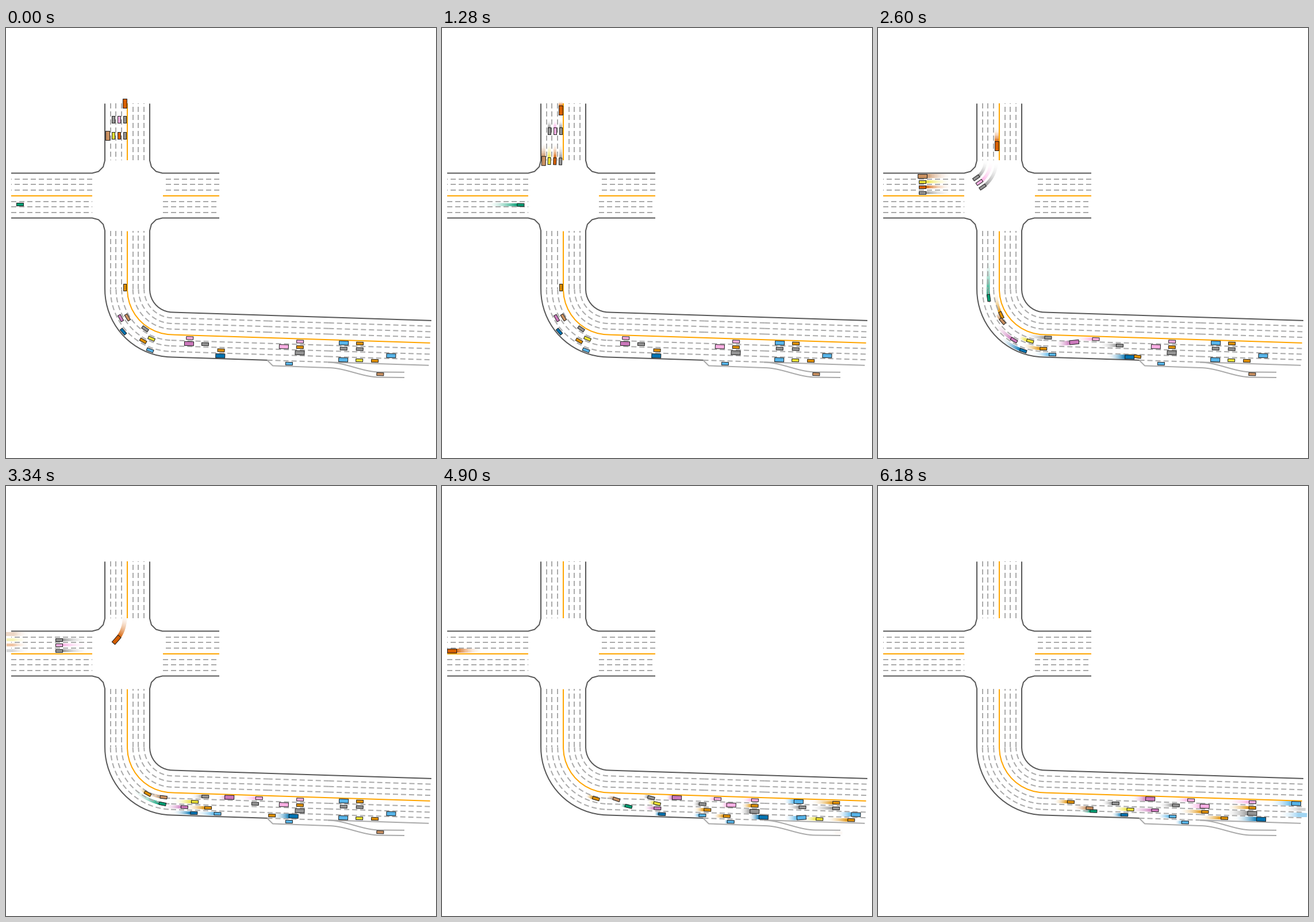
Animation of 748x748 px, one loop 6.2 s. Source, as a matplotlib script:

```python
import numpy as np
import matplotlib.pyplot as plt
from matplotlib.animation import FuncAnimation
from matplotlib.collections import LineCollection, PolyCollection
from matplotlib.colors import to_rgb

SIZE, DPI = 748, 64
PX = 72 / DPI
STEP, STEPS, TRAIL = 20, 310, 20
LANE, SLOPE = 9.75, 0.032
TOP_SPEED = 0.12        # pixels per ms
GO, END = 3700, 6180    # the queue moves off again; last moment of the loop

BLUE, ORANGE, GREEN, RED, PURPLE = "#0173b2", "#de8f05", "#029e73", "#d55e00", "#cc78bc"
BROWN, PINK, GRAY, YELLOW, SKY = "#ca9161", "#fbafe4", "#949494", "#ece133", "#56b4e9"
SMALL, BIG = (12, 5), (16, 7)

clock = np.arange(STEPS) * float(STEP)
clock[:5] = 0           # the opening pose is held
cars = []


# Road frames: u runs along the centre line, d is the offset to the right.
def main_road(u, d):
    """From the west arm, right into the south leg, then left to the east."""
    u, d = np.broadcast_arrays(np.asarray(u, float), d)
    r, q = 79 + d, 61 - d
    a, b = (u - 165) / 79, (u - 63) / 61
    turn = np.pi / 2 - SLOPE
    run = u - 165 - 79 * turn
    where = [b < -np.pi / 2, u < 63, u < 165, a < turn]
    x = np.select(where, [150 + 61 * (b + np.pi / 2), 150 + q * np.cos(b),
                          290 - r, 290 - r * np.cos(a)],
                  290 - r * np.sin(SLOPE) + run * np.cos(SLOPE))
    y = np.select(where, [352 - q, 352 + q * np.sin(b), 289 + u, 454 + r * np.sin(a)],
                  454 + r * np.cos(SLOPE) + run * np.sin(SLOPE))
    h = np.select(where, [0 * b, b + np.pi / 2, 0 * b + np.pi / 2, np.pi / 2 - a], SLOPE)
    return x, y, h


def north_road(u, d):
    """From the north arm, right into the west arm."""
    r = 61 - d
    a = np.clip((u - 230) / 45, 0, np.pi / 2)
    x = 150 + r * np.cos(a) - np.maximum(u - 230 - 45 * np.pi / 2, 0)
    y = 230 + r * np.sin(a) + np.minimum(u - 230, 0)
    return x, y, np.pi / 2 + a


def smooth(s):
    s = np.clip(s, 0, 1)
    return s * s * (3 - 2 * s)


def launch(start, rate):
    """Distance covered from rest at constant acceleration up to top speed."""
    t = np.maximum(clock - start, 0)
    full = TOP_SPEED / (2 * rate)
    return np.where(t < full, rate * t * t, TOP_SPEED * (t - full / 2))


def add(color, size, road, u, lane, end):
    d = LANE * (lane + 0.5) * np.ones(STEPS)
    x, y, h = road(u, d)
    h = h + np.arctan2(np.gradient(d), np.gradient(u) + 0.05)
    l, w = size
    box = np.array([(-l, -w), (l, -w), (l, w), (-l, w)]) / 2
    c, s = np.cos(h)[:, None], np.sin(h)[:, None]
    quads = np.stack([x[:, None] + box[:, 0] * c - box[:, 1] * s,
                      y[:, None] + box[:, 0] * s + box[:, 1] * c], axis=2)
    cars.append((np.array(to_rgb(color)), quads, np.searchsorted(u, end)))


def row(u, start, rate, **by_lane):
    """A row waiting in the north arm that turns off to the west."""
    for name, (color, size) in by_lane.items():
        add(color, size, north_road, u + launch(start, rate), int(name[-1]), 441)


def car(color, u, stop=None, lane=0, size=SMALL, reach=None, wait=0, start=None,
        pace=0.06, end=737):
    """Closes up to `stop`, then moves off by `reach`, with up to two lane changes."""
    stop = stop or u
    first, mid, last = lane if isinstance(lane, tuple) else (lane,) * 3
    if reach is None:
        reach = 85 if first < 2 and stop < 500 else 140
    if start is None:
        start = 1450 + 1.9 * (373 - u) + wait
    close = smooth((clock - start) / max((stop - u) / pace, 1))
    path = u + (stop - u) * close + launch(GO, reach / (END - GO) ** 2)
    lanes = first + (mid - first) * close + (last - mid) * smooth((clock - 4500) / 1600)
    add(color, size, main_road, path, lanes, end)


row(131, 400, 15.2e-6, lane0=(RED, BIG))
row(159, 350, 22.6e-6, lane0=(GRAY, SMALL), lane1=(PINK, SMALL), lane2=(GRAY, SMALL))
row(187, 100, 31.8e-6, lane0=(GRAY, SMALL), lane1=(RED, SMALL), lane2=(YELLOW, SMALL),
    lane3=(BROWN, BIG))

car(GREEN, -159, 309, lane=(1, 1.7, 2.5), start=0, pace=0.117, reach=66)

# Cars in the bend close up on the queue ahead
car(ORANGE, 162, 250, lane=(0, 0.8, 1))
car(PURPLE, 205, 342, lane=2)
car(BROWN, 209, 283, lane=(0.9, 0.4, 2), wait=600)
car(BLUE, 221, 369, lane=3, reach=60)
car(GRAY, 241, 348, lane=(0, 0, 1), reach=65)
car(ORANGE, 248, 429, lane=2)
car(YELLOW, 257, 354, lane=(1, 1, 2), wait=600)
car(SKY, 261, 435, lane=3, reach=78)
car(PURPLE, 318, 388, lane=(1, 0, 0), size=BIG, wait=600)
car(PINK, 319, 459)
car(GRAY, 346, 433, lane=1)
car(BLUE, 373, 527, lane=3, size=BIG)
car(ORANGE, 374, 463, lane=(2, 3, 3))

# The queue ahead waits, then moves off together
car(PINK, 483, lane=1, size=BIG)
car(SKY, 493, lane=4, reach=42)
for color, lane, size in ((PINK, 0, SMALL), (ORANGE, 1, SMALL), (GRAY, 2, BIG)):
    car(color, 511, lane=lane, size=size)
car(SKY, 587, size=BIG)
car(GRAY, 587, lane=1, reach=170)
car(SKY, 587, lane=(3, 3, 2), size=BIG, reach=165)
for lane, color in enumerate((ORANGE, GRAY)):
    car(color, 615, lane=lane, reach=300)
car(YELLOW, 615, lane=3, reach=180)
car(ORANGE, 642, lane=3, reach=300)
car(SKY, 670, lane=2, size=BIG, reach=214)
car(BROWN, 652, lane=5.35, reach=300, end=690)


def trace(a, b, d):
    x, y, _ = main_road(np.linspace(a, b, 60), d)
    return np.column_stack([x, y])


def corner(cx, cy, first, last):
    a = np.radians(np.linspace(first, last, 4))
    return np.column_stack([cx + 22 * np.cos(a), cy + 22 * np.sin(a)])


def join(*parts):
    return np.vstack([np.reshape(p, (-1, 2)) for p in parts])


edges = [
    join((172, 131), corner(150, 230, 0, 90), (9, 252)),
    join((250, 131), corner(272, 230, 180, 90), (371, 252)),
    join((9, 330), corner(150, 352, -90, 0), trace(64, 455, 39)),
    join((371, 330), corner(272, 352, -90, -180), trace(64, 738, -39)),
]
middles = [
    join((211, 131), (211, 230)), join((9, 291.5), (150, 291.5)),
    join((273, 291.5), (371, 291.5)), trace(64, 737, 0),
]

# The slip road leaves along an eased curve
sx = np.linspace(560, 650, 20)
slip = smooth((sx - 560) / 90)
ramp = [
    join((455, 578), (464, 587), np.column_stack([sx, 590.5 + 16.5 * slip]), (693, 607.5)),
    join(np.column_stack([sx, 581 + 17 * slip]), (693, 598.3)),
    trace(560, 736, 39),
]

dashes = [trace(455, 560, 39)]
breaks = [64, 165, 287, 455, 560, 737]
for k in (1, 2, 3):
    o = LANE * k
    dashes += [join((211 - o, 131), (211 - o, 230)), join((211 + o, 230), (211 + o, 131))]
    for a, b in ((9, 150), (273, 371)):
        dashes += [join((a, 291.5 + o), (b, 291.5 + o)), join((b, 291.5 - o), (a, 291.5 - o))]
    for a, b in zip(breaks, breaks[1:]):
        dashes += [trace(a, b, o), trace(b, a, -o)]

fig = plt.figure(figsize=(SIZE / DPI, SIZE / DPI), dpi=DPI, facecolor="white")
ax = fig.add_axes([0, 0, 1, 1])
ax.set_xlim(0, SIZE)
ax.set_ylim(SIZE - 0.5, -0.5)
ax.axis("off")


def strokes(lines, color, z, style="solid"):
    ax.add_collection(LineCollection(lines, colors=color, linewidths=2 * PX,
                                     linestyles=style, zorder=z), autolim=False)


strokes(dashes, "#aaaaaa", 2, [(0, (4.5, 2.5))])
strokes(ramp, "#aaaaaa", 2)
strokes(middles, "#ffa500", 3)
strokes(edges, "#585858", 3)

trails = PolyCollection([], edgecolors="none", linewidths=0, zorder=1)
bodies = PolyCollection([], edgecolors="#202020", linewidths=PX, zorder=4)
for group in (trails, bodies):
    ax.add_collection(group, autolim=False)


def draw(k):
    old, tints = [], []
    for age in range(min(TRAIL - 1, k), 0, -1):
        j = k - age
        keep = (1 - age / TRAIL) ** 2
        for rgb, quads, last in cars:
            parked = k <= last and abs(quads[j] - quads[k]).max() < 0.3
            if j <= last and not parked:
                old.append(quads[j])
                tints.append(1 - keep * (1 - rgb))
    trails.set_verts(old)
    trails.set_facecolor(tints if tints else "none")
    here = [(quads[k], rgb) for rgb, quads, last in cars if k <= last]
    bodies.set_verts([q for q, _ in here])
    bodies.set_facecolor([c for _, c in here])
    return trails, bodies


anim = FuncAnimation(fig, draw, frames=STEPS, interval=STEP, repeat=True, repeat_delay=0)
plt.show()
```
